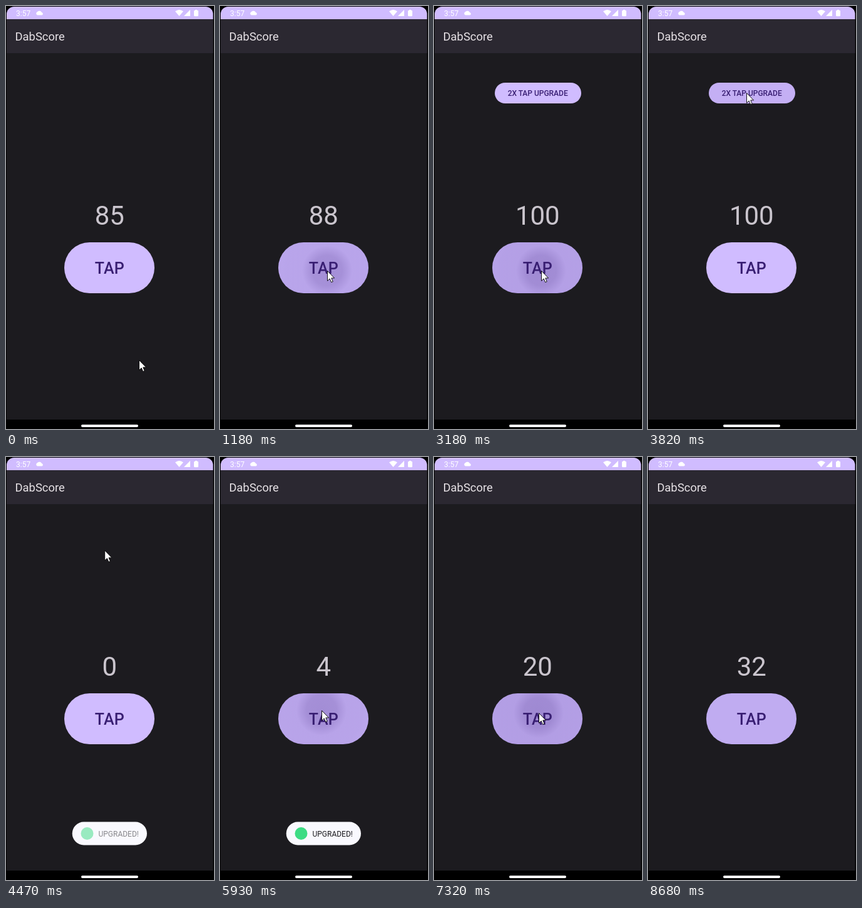
An HTML page that plays this animation: 332 px wide and 673 px high, repeating every 8.91 s.

```html
<!DOCTYPE html>
<html lang="en">
<head>
<meta charset="utf-8">
<title>Tap counter</title>
<style>
  html, body { margin: 0; width: 100%; height: 100%; overflow: hidden; background: #000; }
  svg { display: block; width: 332px; height: 673px; font-family: Roboto, sans-serif; }
  .mid { text-anchor: middle; }
  .label { fill: #381e72; font-weight: 500; }
</style>
</head>
<body>
<svg viewBox="0 0 332 673">
  <defs>
    <radialGradient id="soft">
      <stop offset="0" stop-color="#381e72"/>
      <stop offset=".6" stop-color="#381e72" stop-opacity=".9"/>
      <stop offset="1" stop-color="#381e72" stop-opacity="0"/>
    </radialGradient>
    <clipPath id="tapClip"><rect x="93" y="376" width="144" height="81" rx="40.5"/></clipPath>
    <clipPath id="upClip"><rect x="97" y="122" width="138" height="33" rx="16.5"/></clipPath>
  </defs>

  <rect x="1" y="21" width="329.5" height="637" fill="#1c1b1f"/>
  <rect x="1" y="21" width="329.5" height="54" fill="#2b2831"/>
  <path d="M1 21V13A12 12 0 0 1 13 1H318.500A12 12 0 0 1 330.500 13V21Z" fill="#d0bcff"/>
  <rect x="120" y="666" width="91" height="4" rx="2" fill="#fff"/>

  <g fill="#fff">
    <text x="16" y="16" font-size="12">3:57</text>
    <path d="M50 14.500A2.800 2.800 0 0 1 50 9.300A4 4 0 0 1 57 10.300A2.200 2.200 0 0 1 57.500 14.500Z"/>
    <path d="M276.500 16L270 8.500Q276.500 3.500 283 8.500Z"/>
    <path d="M284 16L294 6V16Z"/>
    <path d="M300 8.300Q300 7 301.200 7H302V6H305V7H305.800Q307 7 307 8.300V15Q307 16.300 305.800 16.300H301.200Q300 16.300 300 15Z"/>
  </g>
  <text x="14.500" y="55" font-size="18.400" fill="#e6e1e5">DabScore</text>

  <g id="upgrade">
    <g clip-path="url(#upClip)">
      <rect x="97" y="122" width="138" height="33" fill="#d0bcff"/>
      <rect id="upTint" x="97" y="122" width="138" height="33" fill="#381e72"/>
      <g id="upRipples" fill="url(#soft)"></g>
    </g>
    <text class="mid label" x="165.700" y="143.200" font-size="12">2X TAP UPGRADE</text>
  </g>

  <text id="score" class="mid" x="165.300" y="347.700" font-size="42" fill="#cac5cd">85</text>

  <g clip-path="url(#tapClip)">
    <rect x="93" y="376" width="144" height="81" fill="#d0bcff"/>
    <rect id="tapTint" x="93" y="376" width="144" height="81" fill="#381e72"/>
    <g id="tapRipples" fill="url(#soft)"></g>
  </g>
  <text class="mid label" x="165.500" y="426" font-size="25" letter-spacing=".3">TAP</text>

  <g id="toast">
    <rect x="105.700" y="580.500" width="119.300" height="37" rx="18.500" fill="#f9f9fe"/>
    <g id="toastBody">
      <circle cx="129.500" cy="599" r="10" fill="#3ddc84"/>
      <text x="147.500" y="603.700" font-size="12" fill="#1c1b1f">UPGRADED!</text>
    </g>
  </g>

  <path id="cursor" d="M.5 .5V16.300L4.200 12.900L6.700 18.600L9.200 17.500L6.800 11.900H11.600Z"
        fill="#fff" stroke="#000" stroke-width=".9" stroke-linejoin="round"/>
</svg>
<script>
const LOOP = 8910, BOUGHT = 4380, SHOWN = 3180;
const LEAD = 60; // from press to counted tap

const singles = [720, 920, 1180, 1350, 1520, 1680, 1840, 1980, 2160, 2300, 2460, 2620, 2780, 2980, 3180];
const doubles = [5740, 5930, 6100, 6280, 6450, 6630, 6810, 6960, 7140, 7320, 7450, 7630, 7800, 7970, 8150, 8310];

// spans of activity; the picture rests between them
const active = [[60, 480], [630, 920], [1180, 1840], [1980, 2160], [2300, 2620], [2780, 3290],
  [3500, 3820], [4290, 4850], [5560, 5740], [5930, 6810], [6930, 7450], [7630, 7970],
  [8150, 8150], [8310, 8680]];

// start, end, x, y, easing
const smooth = p => p * p * (3 - 2 * p);
const moves = [
  [60, 480, 171, 421, smooth],
  [3500, 3820, 157, 138, smooth],
  [4420, 4850, 162, 403, smooth],
  [6930, 7130, 167, 407, smooth],
  [8310, 8680, 301, 680, p => p ** 1.5]
];

const $ = id => document.getElementById(id);
const ramp = (t, a, b) => Math.min(1, Math.max(0, (t - a) / (b - a)));
const bump = (t, a, b, c, d) => ramp(t, a, b) * (1 - ramp(t, c, d));

function rest(t) {
  let end = 0;
  for (const [a, b] of active) {
    if (t < a) return end;
    if (t <= b) return t;
    end = b;
  }
  return end;
}

function pointer(t) {
  let x = 212, y = 563;
  for (const [a, b, nx, ny, ease] of moves) {
    const p = ease(ramp(t, a, b));
    x += (nx - x) * p;
    y += (ny - y) * p;
  }
  return [x, y];
}

function addRipple(parent, press) {
  const el = document.createElementNS("http://www.w3.org/2000/svg", "circle");
  const [x, y] = pointer(press);
  el.setAttribute("cx", x);
  el.setAttribute("cy", y);
  parent.append(el);
  return { el, press };
}

const ripples = [...singles, ...doubles].map(t => addRipple($("tapRipples"), t - LEAD));
ripples.push(addRipple($("upRipples"), 4270));

function draw(time) {
  const t = rest(time);
  const [x, y] = pointer(t);
  $("cursor").setAttribute("transform", `translate(${x} ${y})`);

  const done = list => list.filter(v => v <= t).length;
  $("score").textContent = t < BOUGHT ? 85 + done(singles) : 2 * done(doubles);

  $("tapTint").setAttribute("opacity", 0.1 * (bump(t, 630, 1180, 3500, 3720) + ramp(t, 5560, 6100)));
  $("upTint").setAttribute("opacity", 0.08 * ramp(t, 3770, 3820));
  $("upgrade").setAttribute("visibility", t >= SHOWN && t < BOUGHT ? "visible" : "hidden");

  for (const { el, press } of ripples) {
    const age = t - press;
    el.setAttribute("r", 14 + 96 * ramp(age, 0, 225));
    el.setAttribute("opacity", 0.16 * bump(age, 0, 50, 150, 420));
  }

  $("toast").setAttribute("opacity", bump(t, 4350, 4440, 6400, 6550));
  $("toastBody").setAttribute("opacity", ramp(t, 4370, 4570));
}

const start = performance.now();
function tick(now) {
  draw(Math.max(0, now - start) % LOOP);
  requestAnimationFrame(tick);
}
draw(0);
requestAnimationFrame(tick);
</script>
</body>
</html>
```
